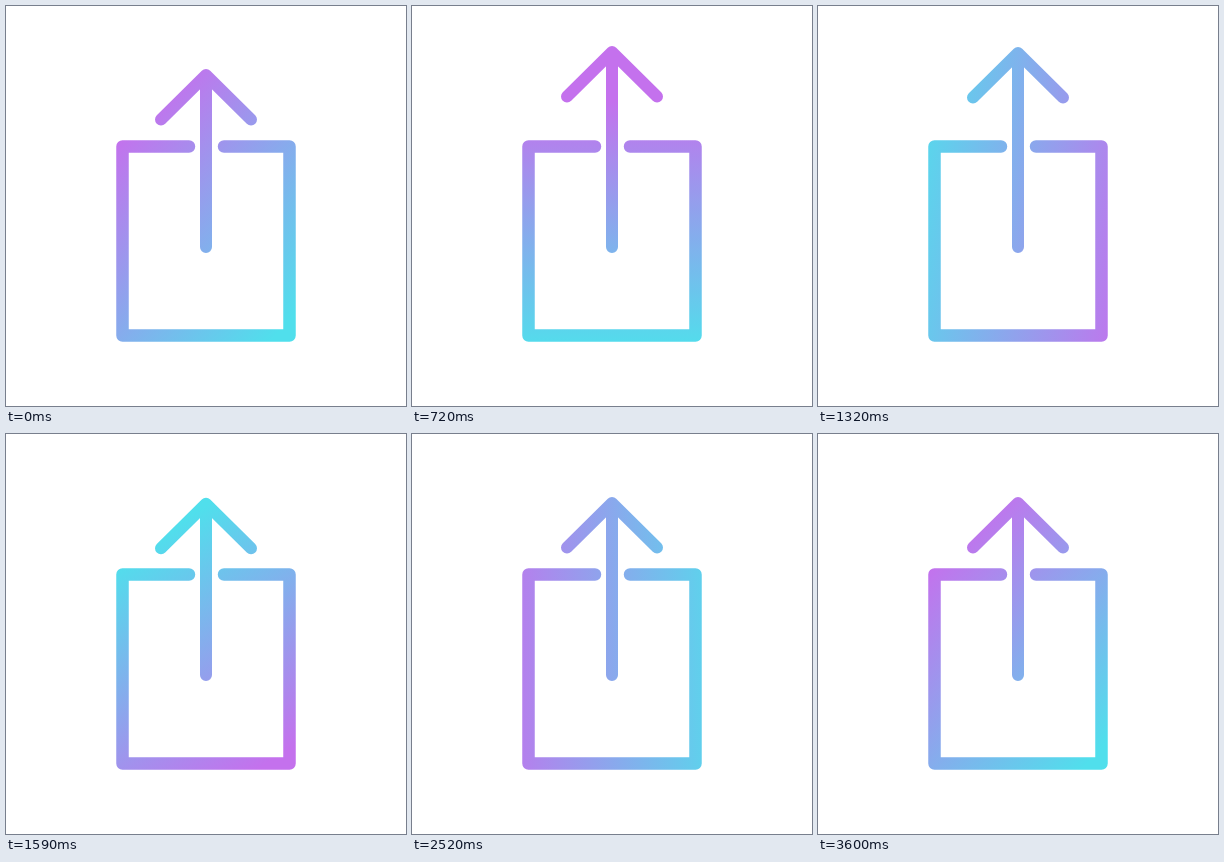
These frames come from a looping animation (400 by 400 pixels, 5660 ms). An HTML page:

```html
<!DOCTYPE html>
<html lang="en">
<head>
<meta charset="utf-8">
<title>Share icon</title>
<style>
  html, body { margin: 0; width: 100%; height: 100%; overflow: hidden; background: #fff; }
  svg { display: block; width: 100%; height: 100%; }
</style>
</head>
<body>
<svg viewBox="0 0 400 400">
  <defs>
    <linearGradient id="tint" gradientUnits="userSpaceOnUse" x1="200" y1="95" x2="200" y2="345">
      <stop offset="0" stop-color="#c471ed"/>
      <stop offset="1" stop-color="#50dfec"/>
    </linearGradient>
  </defs>
  <g fill="none" stroke="url(#tint)" stroke-linecap="round" stroke-linejoin="round">
    <path stroke-width="12.5" d="M183 140.5H116.5V329.5H283.5V140.5H218"/>
    <path id="arrow" stroke-width="12"/>
  </g>
</svg>
<script>
const LOOP = 5660, SPIN = 3600, STEP = 30;
const tint = document.getElementById('tint');
const arrow = document.getElementById('arrow');

// Arrowhead offset: [time, y]
const lift = [[0, 0], [575, -29], [862, -17], [1150, -29], [1720, 5], [2290, 0]];

function liftAt(t) {
  const i = lift.findIndex(k => k[0] > t);
  if (i < 0) return 0;
  const [t0, y0] = lift[i - 1], [t1, y1] = lift[i];
  return y0 + (y1 - y0) * (1 - Math.cos(Math.PI * (t - t0) / (t1 - t0))) / 2;
}

// Cubic Bezier ease (.33, 0, .45, 1), solved by bisection
function ease(x) {
  let lo = 0, hi = 1;
  for (let i = 0; i < 24; i++) {
    const s = (lo + hi) / 2, r = 1 - s;
    if (3 * r * r * s * 0.33 + 3 * r * s * s * 0.45 + s ** 3 < x) lo = s;
    else hi = s;
  }
  return lo * lo * (3 - 2 * lo);
}

function draw(now) {
  const t = Math.min(Math.floor(now % LOOP / STEP) * STEP, SPIN);
  const y = liftAt(t);
  const angle = -48 + 360 * ease(t / SPIN);
  tint.setAttribute('gradientTransform', `rotate(${angle} 200 220)`);
  arrow.setAttribute('d', `M155 ${113.5 + y}L200 ${69 + y}L245 ${113.5 + y}M200 ${69 + y}V241`);
}

const start = performance.now();
function tick() {
  draw(performance.now() - start);
  requestAnimationFrame(tick);
}
tick();
</script>
</body>
</html>
```
